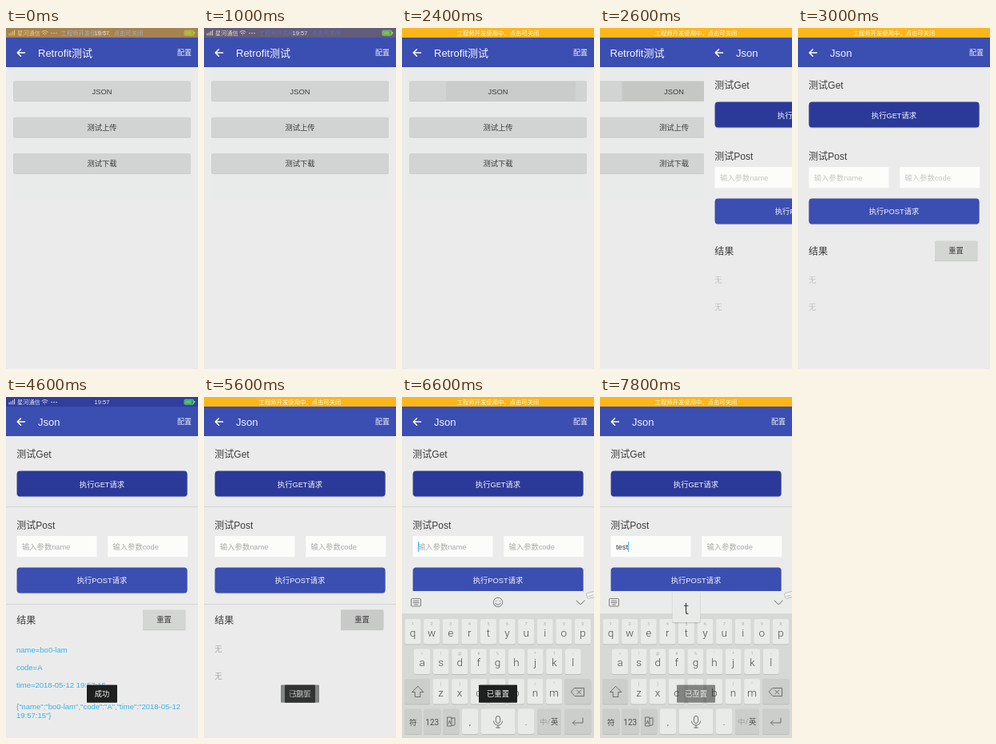
These frames come from a looping animation (240x427 px, 8 s). An HTML page:

```html
<!DOCTYPE html>
<html lang="zh">
<head>
<meta charset="utf-8">
<title>Retrofit测试</title>
<style>
  html, body { margin: 0; width: 100%; height: 100%; overflow: hidden; background: #ebebeb; }
  svg { display: block; width: 100vw; height: 100vh; }
  text { font-family: "Liberation Sans", "Noto Sans CJK SC", "Noto Sans CJK", sans-serif; white-space: pre; }
  #keys text, #popup text { font-family: Roboto, "Noto Sans CJK SC", "Noto Sans CJK", sans-serif; }
</style>
</head>
<body>
<svg id="stage" viewBox="0 0 240 427"></svg>
<script>
const STEP = 200, COUNT = 40;
const BLUE = '#3b4eb2', DARK = '#2b3a99', INK = '#3c3c3c', HINT = '#a9a9a7', CYAN = '#35b2e8';

// Text is placed by its vertical middle.
const text = (x, y, s, size, fill, anchor = 'start', more = '') =>
  `<text x="${x}" y="${y + size * 0.37}" font-size="${size}" fill="${fill}" text-anchor="${anchor}" ${more}>${s}</text>`;
const mid = (x, y, s, size, fill, more) => text(x, y, s, size, fill, 'middle', more);
const box = (x, y, w, h, fill, r = 0, more = '') =>
  `<rect x="${x}" y="${y}" width="${w}" height="${h}" rx="${r}" fill="${fill}" ${more}/>`;
const line = (d, color, w = 1) =>
  `<path d="${d}" fill="none" stroke="${color}" stroke-width="${w}" stroke-linecap="round" stroke-linejoin="round"/>`;
const group = (id, body, more = '') => `<g id="${id}" ${more}>${body}</g>`;
const raised = (x, y, w, h, fill, r) =>
  box(x, y + .8, w, h, '#000', r, 'opacity=".16"') + box(x, y, w, h, fill, r);

const header = title =>
  box(0, 0, 240, 49, BLUE) +
  line('M23.5 31H14.5M18.5 26.7L14.2 31L18.5 35.3', '#fff', 1.5) +
  text(40, 31, title, 13, '#f4f5fb') + text(232, 31, '配置', 9, '#f4f5fb', 'end');

function menuPage() {
  const face = y => raised(9.2, y, 221.8, 25, '#d1d4d2', 2);
  const label = (y, s) => mid(120, y + 13, s, 9.3, INK);
  return box(0, 0, 240, 427, '#ebebeb') + box(8, 50, 224, 164, '#e8ebea') + header('Retrofit测试') +
    face(66.3) + box(55, 67, 162, 24, '#b9bcba', 1, 'id="ripple"') + label(66.3, 'JSON') +
    face(111.7) + label(111.7, '测试上传') + face(157) + label(157, '测试下载');
}

function jsonPage() {
  const button = (y, fill, s) => raised(13.6, y, 213, 32, fill, 4) + mid(120, y + 16.5, s, 9.3, '#f6f7fc');
  const field = x => box(x, 174, 100, 26.3, '#fcfcfb');
  const divider = y => box(0, y, 240, 1, '#d6d6d6');
  const lines = [
    [316, 'name=bo0-lam'], [338, 'code=A'], [360, 'time=2018-05-12 19:57:15'],
    [387, '{"name":"bo0-lam","code":"A","time":"2018-05-12'], [398, '19:57:15"}']
  ];
  return box(0, 0, 240, 427, '#ebebeb') + header('Json') +
    group('dividers', divider(137) + divider(259)) +
    text(13.3, 72, '测试Get', 12, INK) + button(92.6, DARK, '执行GET请求') +
    text(13.3, 160.5, '测试Post', 12, INK) + field(13.5) + field(127.3) +
    group('hints', text(20, 187.5, '输入参数name', 9.3, HINT, 'start', 'id="nameHint"') +
      text(133.5, 187.5, '输入参数code', 9.3, HINT)) +
    text(20, 187.5, '', 9.4, INK, 'start', 'id="typed"') +
    box(20, 181, 1, 13, CYAN, 0, 'id="caret"') +
    button(213.5, BLUE, '执行POST请求') +
    text(13.3, 279.5, '结果', 12, INK) + raised(171, 266.5, 53.3, 25, '#d4d6d3', 1) +
    box(171, 266.5, 53.3, 25, '#c8cac8', 1, 'id="pressed"') + mid(197.5, 279, '重置', 9.3, INK) +
    group('empty', text(13.3, 316, '无', 9.3, HINT) + text(13.3, 349.5, '无', 9.3, HINT)) +
    group('result', lines.map(([y, s]) => text(13, y, s, 9.5, CYAN)).join(''));
}

// Letter rows: letters, small marks, middle of the first key, top edge.
const ROWS = [
  ['qwertyuiop', '1234567890', 13.5, 278],
  ['asdfghjkl', '~!@#%\'*?-', 25, 315.5],
  ['zxcvbnm', '()_:;/"', 48.5, 353]
];
const PITCH = 23.6;

function keyAt(letter) {
  for (const [letters, , x, y] of ROWS) {
    const i = letters.indexOf(letter);
    if (i >= 0) return [x + i * PITCH, y];
  }
}

function keyboard() {
  const gray = '#626462', key = '#e9ebe8', side = '#cbcecb';
  const cap = (x, y, w, fill) => box(x, y + 1, w, 31.5, '#bcbfbc', 2.5) + box(x, y, w, 31.5, fill, 2.5);
  let out = box(0, 243, 240, 29, '#eaece9') + box(0, 271, 240, 156, '#d7d9d6');
  out += box(11.5, 252.5, 12, 9.5, 'none', 1, `stroke="${gray}" stroke-width=".8"`) +
    line('M14 255.3h7M14 257.5h7M15.5 259.8h4', gray, .8) +
    group('smile', `<circle cx="120" cy="257" r="5.7" fill="none" stroke="${gray}" stroke-width=".8"/>` +
      line('M117.8 255.4v.3M122.2 255.4v.3M116.8 258.3Q120 262.2 123.2 258.3', gray, .9)) +
    line('M218.2 255L223.2 260L228.2 255', gray, 1) +
    box(231, 244.5, 12, 7, '#f1f2ef', 1.5, 'stroke="#b5b7b4" stroke-width=".8" transform="rotate(-14 236 248)"') +
    line('M233.5 249.5l5 -1.3', '#b5b7b4', .8);
  for (const [letters, marks, x0, y] of ROWS)
    [...letters].forEach((c, i) => {
      const x = x0 + i * PITCH;
      out += cap(x - 10, y, 20, key) + mid(x, y + 6, marks[i], 5, '#a7a9a6') +
        mid(x, y + 17, c, 13.5, '#4b4d4b', 'font-weight="300"');
    });
  out += cap(3, 353, 32, side) + line('M19.5 362.5l-7 7h3.7v6h6.6v-6h3.7z', gray, .9) +
    cap(203, 353, 33.5, side) + line('M216 364.5h11.5v10h-11.5l-4.5 -5zM218.8 367l5 5M223.8 367l-5 5', gray, .9);
  const bottom = [[3, 21.5, '符', side], [27, 21.5, '123', side], [51, 20.5, '', side], [75, 20, ',', key],
    [98.5, 43, '', key], [145, 20, '.', key], [169, 30, '', side], [203, 33.5, '', side]];
  for (const [x, w, s, fill] of bottom)
    out += cap(x, 390.5, w, fill) + mid(x + w / 2, 407, s, s.length > 1 ? 10 : 9.6, '#4b4d4b');
  return out +
    line('M57 401h5v11h-5zM62 402.5l4 -.8v9l-4 .9M58.3 409l1.2 -4l1.2 4', gray, .9) +
    box(117.4, 399.5, 5.2, 9, 'none', 2.6, `stroke="${gray}" stroke-width=".9"`) +
    line('M114.5 406Q115 411 120 411Q125 411 125.5 406M120 411v3M117.5 414h5', gray, .9) +
    text(172, 407, '中/', 9.4, '#a0a2a0') + text(186, 407, '英', 9.4, '#4b4d4b') +
    line('M226 402v6h-12.5M216.5 405l-3 3l3 3', gray, .9);
}

const popup = () => group('popup',
  box(-18, -34.5, 36, 40, '#000', 3, 'opacity=".13"') + box(-17.5, -35, 35, 39, '#e9ebe8', 2.5) +
  mid(0, -13, '', 20, '#3c3e3c', 'id="popupLetter" font-weight="300"'));

const toast = (id, w, s) =>
  group(id, box(120 - w / 2, 360.6, w, 22.2, '#1d201f', 1) + mid(120, 371.8, s, 9.3, '#f3f3f3'));

function statusBars() {
  const pale = '#dfe3f5';
  return box(0, 0, 240, 12, '#fcb61b') +
    mid(120, 6.2, '工程师开发使用中，点击可关闭', 7.35, '#fff8e4') +
    group('status', box(0, 0, 240, 12, '#303e9c') +
      line('M4 9V7M6.2 9V6M8.4 9V4.5M10.6 9V3', pale, 1) +
      text(14, 6.2, '星河通信', 7.2, pale) +
      line('M45 5Q48.5 1.8 52 5M46.4 6.8Q48.5 4.8 50.6 6.8M48.5 8.6v.1', pale, 1) +
      line('M57 6.5h.1M60 6.5h.1M63 6.5h.1', pale, 1.4) +
      mid(120, 6.2, '19:57', 7.5, pale) +
      box(223, 3.2, 11.5, 6, '#2c9a58', 1, 'stroke="#7fd39a" stroke-width=".8"') +
      box(224.2, 4.4, 7.5, 3.6, '#48c96c') + box(235, 5, 1.3, 2.4, '#7fd39a'));
}

const stage = document.getElementById('stage');
stage.innerHTML = group('menu', menuPage()) + group('json', jsonPage()) +
  group('keys', keyboard()) + popup() +
  toast('doneToast', 38, '成功') + toast('resetToast', 48, '已重置') + statusBars();

const $ = id => document.getElementById(id);
const fade = (id, v) => $(id).setAttribute('opacity', v);
const move = (id, x, y = 0) => $(id).setAttribute('transform', `translate(${x} ${y})`);

// Each track lists [step, value]; a value holds until the next entry.
const TRACKS = {
  status: [[0, .42], [1, .75], [2, 1], [5, .75], [6, .42], [7, 0]],
  ripple: [[0, 0], [12, .35], [13, .5], [15, 0]],
  jsonX: [[0, 240], [13, 130], [14, 16], [15, 0]],
  soft: [[0, .65], [19, 1]],
  dividers: [[0, 0], [19, 1]],
  result: [[0, 0], [20, .4], [21, 1], [27, 0]],
  pressed: [[0, 0], [26, 1], [30, 0]],
  doneToast: [[0, 0], [21, .4], [22, .8], [23, 1], [28, .8], [29, .3], [30, 0]],
  resetToast: [[0, 0], [28, .5], [29, .85], [30, 1], [38, .85], [39, .5]],
  keysY: [[0, 184], [32, 80], [33, 0]],
  caret: [[0, 0], [32, 1]],
  typed: [[0, ''], [35, 't'], [36, 'te'], [37, 'tes'], [39, 'test']],
  popup: [[0, ''], [35, 't'], [36, 'e'], [37, 's'], [38, ''], [39, 't']]
};
const FADES = ['ripple', 'dividers', 'pressed', 'doneToast', 'resetToast', 'caret', 'result'];
const at = (name, k) => TRACKS[name].reduce((v, [from, next]) => k >= from ? next : v, 0);

function draw(k) {
  fade('status', at('status', k % 20));
  for (const id of FADES) fade(id, at(id, k));
  fade('empty', (1 - at('result', k)) * at('soft', k));
  fade('hints', at('soft', k));

  const x = at('jsonX', k);
  move('json', x);
  move('menu', (x - 240) / 4);
  move('keys', 0, at('keysY', k));

  const typed = at('typed', k);
  $('typed').textContent = typed;
  fade('nameHint', typed ? 0 : 1);
  fade('smile', typed ? 0 : 1);
  $('caret').setAttribute('x', 20 + (typed ? $('typed').getComputedTextLength() : 0));

  const letter = at('popup', k);
  fade('popup', letter ? 1 : 0);
  if (letter) {
    move('popup', ...keyAt(letter));
    $('popupLetter').textContent = letter;
  }
}

const start = performance.now();
let shown = -1;
function tick() {
  const k = Math.floor((performance.now() - start) / STEP) % COUNT;
  if (k !== shown) draw(shown = k);
  requestAnimationFrame(tick);
}
tick();
</script>
</body>
</html>
```
